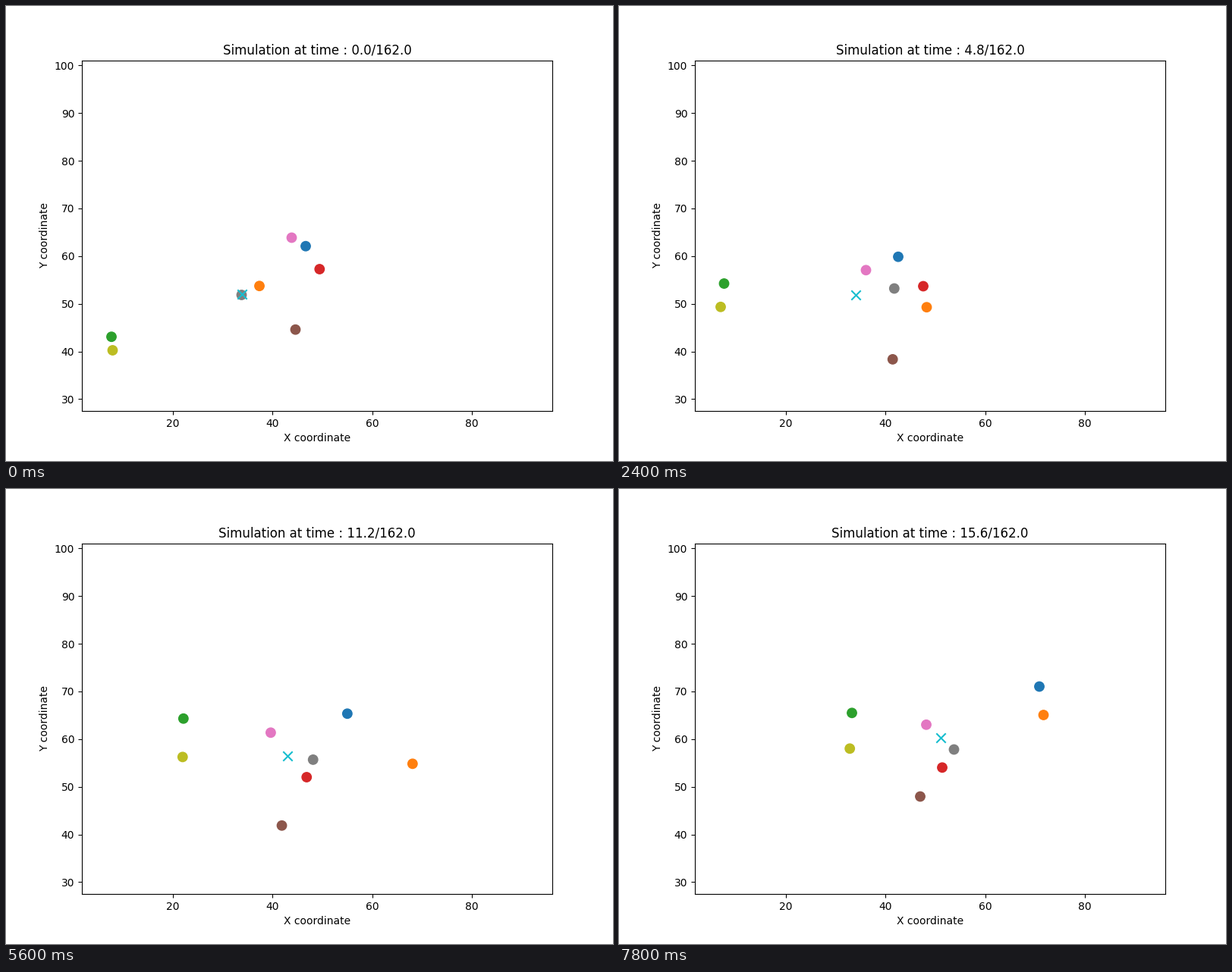
A matplotlib script for the animation above (8000 ms loop, 800 by 600 pixels).

```python
import numpy as np
import matplotlib.pyplot as plt
from matplotlib.animation import FuncAnimation

FRAMES, STEP_MS = 40, 200
W, H, DPI = 800, 600, 100
DOT = 80

# The group's centre drifts along these stage pixels
DRIFT_AT = np.array([0, 5, 12, 22, 28, 35, 39])
DRIFT = [(311.3, 379.6), (303.1, 386.4), (312, 380.9), (346.3, 365.9),
         (370.7, 352.1), (401, 334.2), (424.3, 327.9)]

# Each dot swings smoothly around the centre through a few key places
SWING_AT = np.array([0, 5, 12, 22, 39])
DOTS = {
    "C0": [(395, 316.7), (378, 351), (368, 330.7), (406.5, 311.3), (554, 260.5)],
    "C1": [(334, 369.2), (350.5, 384.7), (405.5, 397.2), (503.3, 388.2), (559.5, 298)],
    "C2": [(139, 436.2), (113.5, 414), (138.5, 366), (198, 318.2), (307, 295.3)],
    "C3": [(413.3, 347), (407.5, 352.7), (401, 369.5), (392, 383.5), (426, 367.3)],
    "C5": [(381.5, 426.7), (371, 448.3), (360.7, 465.9), (356.2, 461), (397, 405.5)],
    "C6": [(376.5, 305.5), (345.7, 340.3), (325.5, 348.3), (330.8, 332.2), (405, 310.8)],
    "C7": [(310.5, 381), (352, 373), (362.8, 372.5), (386.8, 366), (441.5, 343.5)],
    "C8": [(140.5, 454), (106.5, 427), (134, 396.8), (197, 366.6), (304.2, 342.3)],
}


def spline(knots, pts):
    """Natural cubic spline through pts, sampled at every frame."""
    pts, t = np.asarray(pts, float), np.arange(FRAMES)
    h = np.diff(knots).astype(float)
    slope = np.diff(pts, axis=0) / h[:, None]
    n = len(knots)
    a, b = np.eye(n), np.zeros((n, 2))
    for i in range(1, n - 1):
        a[i, i - 1:i + 2] = h[i - 1], 2 * (h[i - 1] + h[i]), h[i]
        b[i] = 6 * (slope[i] - slope[i - 1])
    m = np.linalg.solve(a, b)
    k = np.clip(np.searchsorted(knots, t, side="right") - 1, 0, n - 2)
    d, hk = (t - knots[k])[:, None], h[k][:, None]
    speed = slope[k] - hk * (2 * m[k] + m[k + 1]) / 6
    return pts[k] + d * (speed + d * (m[k] / 2 + d * (m[k + 1] - m[k]) / (6 * hk)))


fig, ax = plt.subplots(figsize=(W / DPI, H / DPI), dpi=DPI)
ax.set_xlim(1.77, 96.1)
ax.set_ylim(27.515, 101.015)
ax.set_xlabel("X coordinate")
ax.set_ylabel("Y coordinate")
title = ax.set_title("")

drift = spline(DRIFT_AT, DRIFT)
pixels = np.stack([drift + spline(SWING_AT, keys - drift[SWING_AT])
                   for keys in DOTS.values()], axis=1)
pixels[..., 1] = H - pixels[..., 1]
to_data = ax.transData.inverted()
places = to_data.transform(pixels.reshape(-1, 2)).reshape(pixels.shape)

dots = ax.scatter(*places[0].T, s=DOT, c=list(DOTS))
center = ax.scatter(*places[0].mean(axis=0), s=DOT, c="C9", marker="x")


def update(i):
    dots.set_offsets(places[i])
    center.set_offsets(places[i].mean(axis=0))
    title.set_text(f"Simulation at time : {0.4 * i:.1f}/162.0")
    return dots, center, title


anim = FuncAnimation(fig, update, frames=FRAMES, interval=STEP_MS,
                     repeat=True, repeat_delay=0)
plt.show()
```
